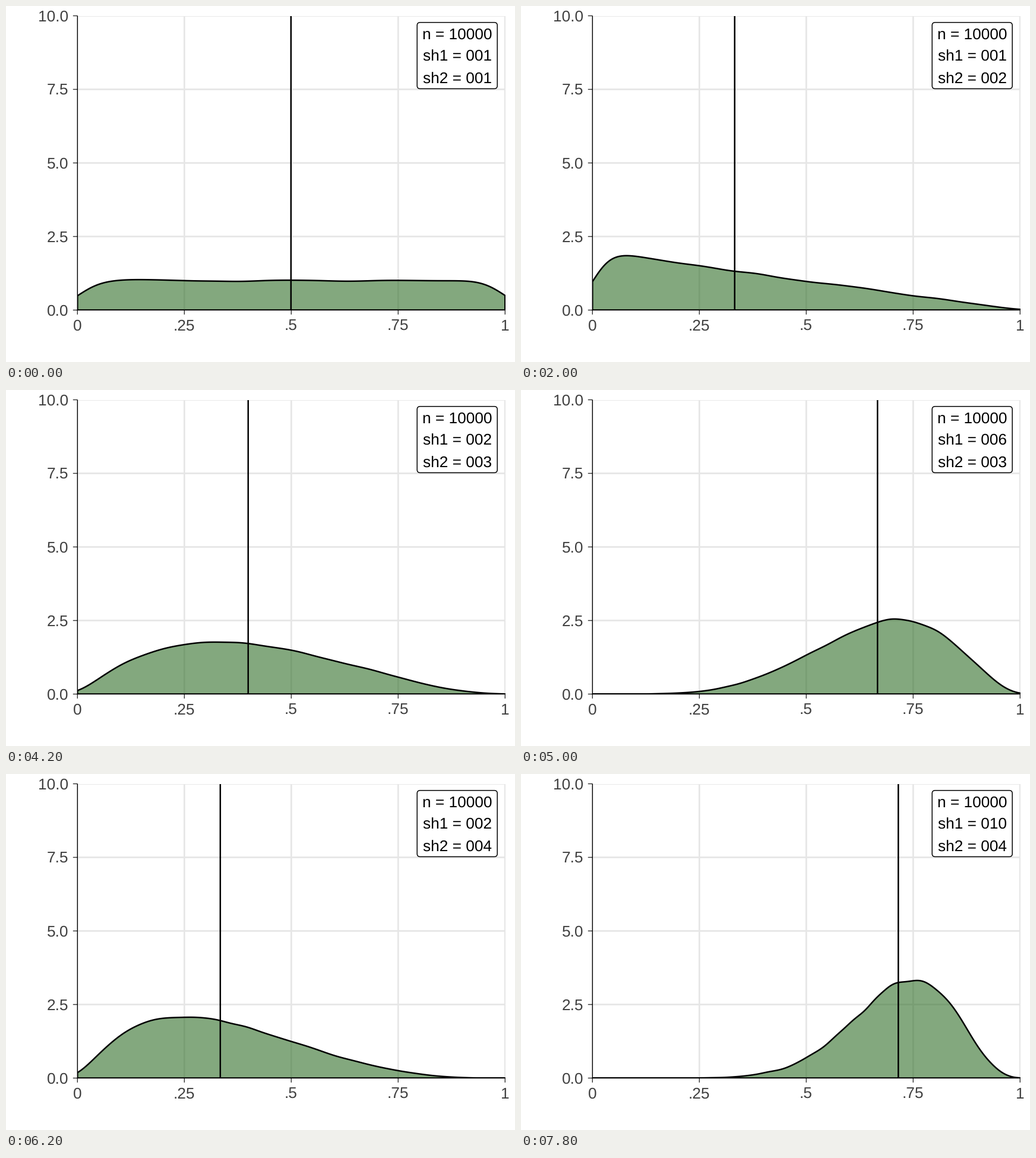
Animation, 857 px wide and 600 px high, one loop 8 s. Source, as a matplotlib script:

```python
import math

import matplotlib.pyplot as plt
import numpy as np
from matplotlib.animation import FuncAnimation
from matplotlib.patches import FancyBboxPatch, Polygon, Rectangle

W, H, DPI = 857, 600, 100
PT = 72 / DPI                       # points per pixel
LEFT, RIGHT, TOP, BASE = 120.3, 840.3, 16.5, 512.5
N = 10000
DRAWS = 4 * N                       # extra draws keep the ripples gentle
STEPS = 10                          # sh1 runs 1..10 for every sh2
FONT = "Liberation Sans"
GREY = "#404040"

EDGES = np.linspace(0, 1, 1001)
MIDS = (EDGES[1:] + EDGES[:-1]) / 2
XS = np.linspace(0, 1, 401)


def px(x):
    return LEFT + (RIGHT - LEFT) * x


def py(y):
    return BASE - (BASE - TOP) * y / 10


def density(draws):
    """Gaussian kernel density with the rule-of-thumb bandwidth for N."""
    q1, q3 = np.percentile(draws, [25, 75])
    bw = .9 * min(draws.std(), (q3 - q1) / 1.34) * N ** -.2
    share = np.histogram(draws, EDGES)[0] / len(draws)
    kernel = np.exp(-.5 * ((XS[:, None] - MIDS) / bw) ** 2)
    return kernel @ share / (bw * math.sqrt(2 * math.pi))


plt.rcParams["text.hinting"] = "none"
fig = plt.figure(figsize=(W / DPI, H / DPI), dpi=DPI, facecolor="white")
ax = fig.add_axes([0, 0, 1, 1])
ax.set_xlim(0, W)
ax.set_ylim(H, 0)
ax.axis("off")
panel = Rectangle((LEFT, TOP), RIGHT - LEFT + .7, BASE - TOP,
                  transform=ax.transData)


def stroke(xs, ys, width, color, z, clip=False):
    line, = ax.plot(xs, ys, color=color, lw=width * PT, zorder=z,
                    solid_capstyle="butt", snap=False)
    if clip:
        line.set_clip_path(panel)
    return line


def label(x, y, text, align, color):
    return ax.text(x, y, text, ha=align, va="baseline", color=color,
                   family=FONT, fontsize=26.2 * PT, zorder=6)


for i, name in enumerate(["0", ".25", ".5", ".75", "1"]):
    x, y = px(i / 4), py(i * 2.5)
    stroke([x, x], [TOP, BASE], 2.7, "#e6e6e6", 1, clip=True)
    stroke([LEFT, RIGHT], [y, y], 2.7, "#e6e6e6", 1, clip=True)
    stroke([x, x], [BASE, BASE + 7.5], 1.4, "#333333", 4)
    stroke([LEFT - 7.5, LEFT], [y, y], 1.4, "#333333", 4)
    label(x - .4, 547, name, "center", GREY)
    label(105.2, y + 9.5, f"{i * 2.5:.1f}", "right", GREY)

area = Polygon([(0, 0)], closed=True, fc=(48 / 255, 110 / 255, 40 / 255, .6),
               ec="black", lw=2.5 * PT, joinstyle="round", zorder=2)
ax.add_patch(area)
area.set_clip_path(panel)
mean_line = stroke([0, 0], [TOP, BASE], 2.5, "black", 3, clip=True)
stroke([LEFT, LEFT], [TOP, BASE + .7], 1.4, "black", 4)
stroke([LEFT - .7, RIGHT], [BASE, BASE], 1.4, "black", 4)

ax.add_patch(FancyBboxPatch((692.2, 27.7), 135, 111.7,
                            boxstyle="round,pad=0,rounding_size=5",
                            fc="white", ec="black", lw=1.5 * PT, zorder=5))
label(818.5, 55.3, f"n = {N}", "right", "black")
sh1 = label(818.5, 93, "", "right", "black")
sh2 = label(818.5, 130.7, "", "right", "black")


def update(frame):
    a, b = frame % STEPS + 1, frame // STEPS + 1
    draws = np.random.default_rng(frame).beta(a, b, DRAWS)
    curve = np.column_stack([px(XS), py(density(draws))])
    area.set_xy(np.vstack([curve, [(RIGHT, BASE), (LEFT, BASE)]]))
    mean = px(draws.mean())
    mean_line.set_xdata([mean, mean])
    sh1.set_text(f"sh1 = {a:03d}")
    sh2.set_text(f"sh2 = {b:03d}")
    return area, mean_line, sh1, sh2


anim = FuncAnimation(fig, update, frames=4 * STEPS, interval=200,
                     repeat=True, repeat_delay=0)
plt.show()
```
